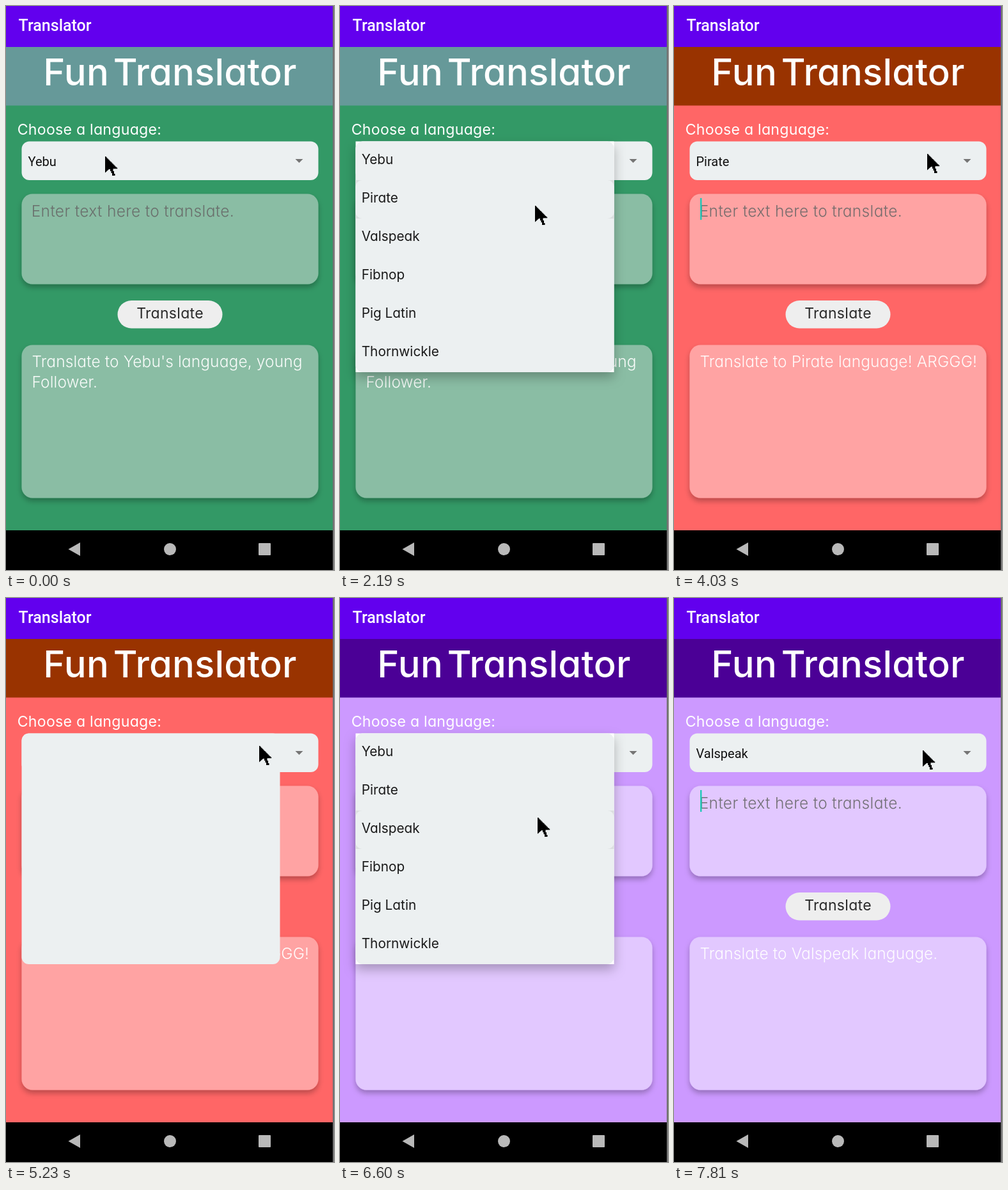
An HTML page that plays this animation: 513x881 px, repeating every 8000 ms.

```html
<!DOCTYPE html>
<html lang="en">
<head>
<meta charset="utf-8">
<title>Fun Translator</title>
<style>
  html, body { margin: 0; width: 100%; height: 100%; overflow: hidden; background: #000; }
  svg { display: block; width: 513px; height: 881px; }
  text { white-space: pre; }
  .geo { font-family: Inter, sans-serif; font-feature-settings: "cv11"; font-optical-sizing: none; }
  .title { font-size: 58px; font-weight: 450; letter-spacing: .2px; word-spacing: -9px; }
  .light { font-weight: 300; font-size: 24.5px; letter-spacing: .12px; }
  .hint { letter-spacing: .35px; }
  .rob { font-family: Roboto, sans-serif; }
  .mid { text-anchor: middle; }
</style>
</head>
<body>
<svg viewBox="0 0 513 881" xmlns="http://www.w3.org/2000/svg">
  <defs>
    <filter id="lift" x="-10%" y="-10%" width="120%" height="130%">
      <feDropShadow dx="0" dy="5" stdDeviation="4.5" flood-color="#000" flood-opacity=".27"/>
    </filter>
    <filter id="float" x="-10%" y="-10%" width="120%" height="120%">
      <feDropShadow dx="0" dy="8" stdDeviation="9" flood-color="#000" flood-opacity=".27"/>
    </filter>
  </defs>

  <rect id="page" y="64" width="511" height="755"/>
  <rect id="band" y="64" width="511" height="91.5"/>
  <rect width="511" height="64" fill="#6200ee"/>
  <text class="rob" x="19.5" y="39" font-size="25" font-weight="500" fill="#fff">Translator</text>
  <text class="geo title mid" x="256.5" y="123.5" fill="#fff">Fun Translator</text>
  <text class="geo" x="17.7" y="201" font-size="23.2" letter-spacing=".22" fill="#fff">Choose a language:</text>

  <rect x="24.5" y="211.5" width="464" height="60.5" rx="12" fill="#ecf0f1"/>
  <text id="choice" class="rob" x="34.5" y="249.5" font-size="20" fill="#111"></text>
  <circle id="ripple" cx="458" cy="242" fill="#cfd2d3"/>
  <path d="M452.5 239h12l-6 6z" fill="#757575"/>

  <rect class="box" x="24.5" y="293.5" width="464" height="141" rx="17" filter="url(#lift)"/>
  <text class="geo light hint" x="39.7" y="328.5" fill="#666" fill-opacity=".9">Enter text here to translate.</text>
  <rect id="caret" x="41" y="300" width="2.4" height="34" fill="#1fc9b8"/>

  <rect x="174.5" y="460" width="164" height="43.5" rx="21.7" fill="#eee"/>
  <text class="geo mid" x="256.5" y="488" font-size="23" letter-spacing=".3" fill="#2a2a2a">Translate</text>

  <rect class="box" x="24.5" y="529.5" width="464" height="239" rx="17" filter="url(#lift)"/>
  <g class="geo light" fill="#fff" fill-opacity=".95">
    <text id="line1" x="40.5" y="564"></text>
    <text id="line2" x="40.5" y="595.5"></text>
  </g>

  <g id="popup">
    <rect id="sheet" x="24.5" y="211.5" width="404" height="360.5" fill="#fff" filter="url(#float)"/>
    <rect x="24.5" y="211.5" width="404" height="360.5" rx="11" fill="#ecf0f1"/>
    <g id="items">
      <g id="hover">
        <rect x="24.5" width="404" height="60" fill="#dcdfe0"/>
        <rect x="24.5" width="404" height="60" rx="10" fill="#ecf0f1"/>
      </g>
    </g>
  </g>

  <rect y="819" width="513" height="62"/>
  <g fill="#b9b9b9">
    <path d="M97.5 848.5L116 838v21z"/>
    <circle cx="256.5" cy="848.5" r="9.5"/>
    <rect x="395" y="839" width="19" height="19" rx="1"/>
  </g>
  <rect x="511" width="2" height="881" fill="#707070"/>
  <path id="cursor"/>
</svg>
<script>
const LOOP = 8000;
const $ = id => document.getElementById(id);
const boxes = document.querySelectorAll('.box');
const set = (el, attrs) => { for (const k in attrs) el.setAttribute(k, attrs[k]); };

const languages = ['Yebu', 'Pirate', 'Valspeak', 'Fibnop', 'Pig Latin', 'Thornwickle'];

const themes = [
  { at: 0, page: '#339966', band: '#669999', box: '#8abda4',
    lines: ["Translate to Yebu's language, young", 'Follower.'] },
  { at: 2910, page: '#ff6666', band: '#993300', box: '#ffa3a3',
    lines: ['Translate to Pirate language! ARGGG!', ''] },
  { at: 6600, page: '#cc99ff', band: '#4b0096', box: '#e2c8ff',
    lines: ['Translate to Valspeak language.', ''] }
];

// Pointer moves: start, end, number of steps, target, bow of the path
const moves = [
  { a: 170, b: 580, n: 4, to: [325, 240], bow: -7 },
  { a: 2060, b: 2190, n: 2, to: [305, 312], bow: 0 },
  { a: 3330, b: 4030, n: 6, to: [396, 231], bow: 0 },
  { a: 5510, b: 5920, n: 4, to: [309, 343], bow: 0 },
  { a: 7000, b: 7810, n: 7, to: [389, 238], bow: -30 }
];

// Dropdown visits: ripple start, ripple full, sheet, items, fade, gone
const visits = [
  [1380, 1530, 1800, 1930, 3030, 3170],
  [4960, 5100, 5230, 5380, 6740, 6880]
];
const carets = [[580, 1010], [4030, 4440], [7810, LOOP]];

// Pixelated pointer with a stepped right edge
set($('cursor'), {
  d: 'M0 0' + 'h1.6v1.6'.repeat(12) + 'H12.5V23H14V27H15.5V30H11V26H9.5V23H8V20H6L0 25.5Z'
});

languages.forEach((name, i) => {
  const el = document.createElementNS('http://www.w3.org/2000/svg', 'text');
  set(el, { class: 'geo', x: 33.7, y: 247 + 60 * i, 'font-size': 20.8, fill: '#1a1a1a' });
  el.textContent = name;
  $('items').append(el);
});

function stepped(t, { a, b, n }) {
  if (t < a) return 0;
  return Math.min(1, (Math.floor((t - a) / (b - a) * (n - 1) + 1e-6) + 1) / n);
}

function pointer(t) {
  let [x, y] = [155, 235];
  for (const m of moves) {
    const f = stepped(t, m);
    x += (m.to[0] - x) * f;
    y += (m.to[1] - y) * f + m.bow * Math.sin(Math.PI * f);
  }
  return [x, y];
}

function draw(t) {
  const index = themes.filter(th => t >= th.at).length - 1;
  const theme = themes[index];
  set($('page'), { fill: theme.page });
  set($('band'), { fill: theme.band });
  boxes.forEach(b => set(b, { fill: theme.box }));
  $('choice').textContent = languages[index];
  $('line1').textContent = theme.lines[0];
  $('line2').textContent = theme.lines[1];

  const [x, y] = pointer(t);
  set($('cursor'), { transform: `translate(${x.toFixed(1)} ${y.toFixed(1)})` });
  set($('caret'), { opacity: carets.some(([on, off]) => t >= on && t < off) ? 1 : 0 });

  const visit = visits.find(v => t >= v[0] && t < v[5]);
  const phase = visit ? visit.filter(at => t >= at).length : 0;
  set($('ripple'), { r: phase === 1 ? 20 : 25, opacity: [0, .55, 1][phase] || 0 });
  set($('popup'), { opacity: phase < 3 ? 0 : phase === 5 ? .5 : 1 });
  const full = phase >= 4 ? 1 : 0;
  set($('sheet'), { opacity: full });
  set($('items'), { opacity: full });
  const row = Math.max(0, Math.min(5, Math.floor((y - 212) / 60)));
  set($('hover'), { transform: `translate(0 ${212 + 60 * row})`, opacity: row > 0 ? 1 : 0 });
}

const start = performance.now();
function tick() {
  draw((performance.now() - start) % LOOP);
  requestAnimationFrame(tick);
}
tick();
</script>
</body>
</html>
```
